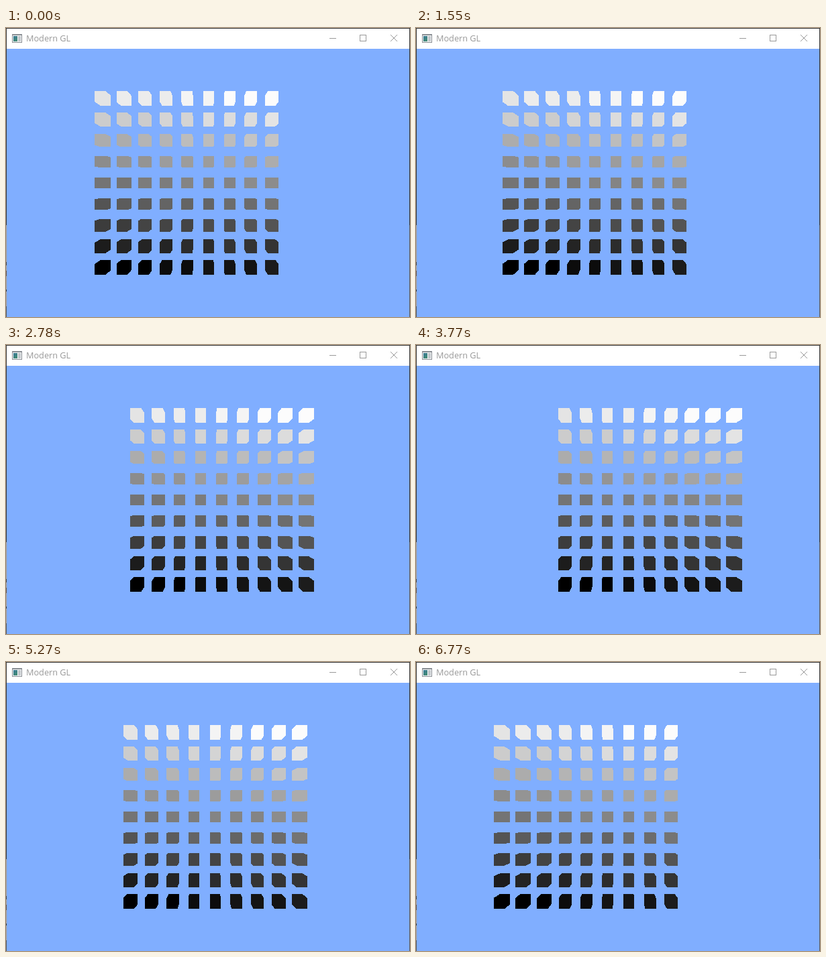
Animation, 602 px wide and 431 px high, one loop 6790 ms. Source, as an HTML page with a canvas:

```html
<!DOCTYPE html>
<html lang="en">
<head>
<meta charset="utf-8">
<title>Modern GL</title>
<style>
  html, body { margin: 0; width: 100%; height: 100%; overflow: hidden; background: #80aeff; }
  canvas { position: absolute; left: 0; top: 0; display: block; }
  #title {
    position: absolute; left: 30px; top: 7px; line-height: 17px; white-space: nowrap;
    font-family: "Open Sans", "Noto Sans", sans-serif; font-size: 12.7px; color: #999;
  }
</style>
</head>
<body>
<canvas id="view" width="602" height="431"></canvas>
<div id="title">Modern GL</div>
<script>
const ctx = document.getElementById('view').getContext('2d');
const LOOP = 6790;
const CX = 301, CY = 231;      // centre of projection
const GAP = 32.24;             // spacing of the front faces
const HALF = GAP / 4;          // half a front face
const DEPTH = 0.95;            // scale of the back faces
const SWING = 1.5 * GAP;

// Runs of evenly spaced picture changes: first time, last time, count
const runs = [
  [120, 1160, 9], [1280, 2210, 8], [2330, 3350, 8], [3500, 3770, 3],
  [4050, 4990, 8], [5140, 6110, 8], [6230, 6770, 5]
];
const steps = [0];
for (const [a, b, n] of runs)
  for (let i = 0; i < n; i++) steps.push(Math.round((a + (b - a) * i / (n - 1)) / 10) * 10);

const lerp = (a, b, t) => a + (b - a) * t;

function rect(color, x, y, w, h) {
  ctx.fillStyle = color;
  ctx.fillRect(x, y, w, h);
}

function shade(i) {
  const bin = Math.round(i / 80 * 255) >> 3;
  const v = bin ? bin * 8 + 4 : 0;
  return `rgb(${v},${v},${v})`;
}

// Silhouette of a cube, filled by hard-edged scanlines.
// (x, y) is the centre of its front face relative to the projection centre.
function cube(x, y, color) {
  ctx.fillStyle = color;
  const top = y - HALF, bottom = y + HALF;
  const y0 = Math.min(top, top * DEPTH), y1 = Math.max(bottom, bottom * DEPTH);
  for (let py = Math.floor(CY + y0); py <= CY + y1; py++) {
    const sy = py + 0.5 - CY;
    // Range of depths k whose slice crosses this line: top * k <= sy <= bottom * k
    let lo = DEPTH, hi = 1;
    for (const [edge, sign] of [[top, 1], [bottom, -1]]) {
      const e = edge * sign, s = sy * sign;
      if (e > 0) hi = Math.min(hi, s / e);
      else if (e < 0) lo = Math.max(lo, s / e);
    }
    if (lo > hi) continue;
    const left = Math.min((x - HALF) * lo, (x - HALF) * hi);
    const right = Math.max((x + HALF) * lo, (x + HALF) * hi);
    const px = Math.round(CX + left);
    ctx.fillRect(px, py, Math.round(CX + right) - px, 1);
  }
}

function icon() {
  rect('#8a8f94', 9, 9, 15, 13);
  rect('#f4f6f7', 10, 11, 13, 10);
  const g = ctx.createLinearGradient(11, 12, 17, 20);
  g.addColorStop(0, '#3f7d9c');
  g.addColorStop(1, '#3f8a6c');
  rect(g, 11, 12, 6, 8);
  rect('#c3c8cc', 18, 12, 4, 8);
}

function frame() {
  rect('#fff', 0, 0, 602, 31);
  icon();
  rect('#999', 482, 15, 10, 1);
  ctx.strokeStyle = '#999';
  ctx.lineWidth = 1;
  ctx.strokeRect(527.5, 10.5, 9, 9);
  ctx.beginPath();
  ctx.moveTo(573, 10); ctx.lineTo(583, 20);
  ctx.moveTo(583, 10); ctx.lineTo(573, 20);
  ctx.stroke();
  rect('#333', 0, 0, 602, 1);
  rect('#333', 0, 0, 1, 294);
  rect('#a59a90', 0, 294, 1, 137);
  rect('#4a4038', 0, 349, 1, 5);
  rect('#6b4f3a', 0, 362, 1, 8);
  rect('#333', 0, 390, 1, 3);
  rect('#555', 0, 415, 1, 16);
  rect('#333', 601, 0, 1, 294);
  rect('#5c5a5c', 601, 294, 1, 137);
}

function draw(time) {
  const shift = SWING * Math.sin(0.00104 * time - 2.43);
  rect('#80aeff', 0, 0, 602, 431);
  for (let row = 0; row < 9; row++)
    for (let col = 0; col < 9; col++)
      cube((col - 4) * GAP + shift, (4 - row) * GAP, shade(row * 9 + col));
  frame();
}

const start = performance.now();
let shown = -1;
function tick() {
  const t = (performance.now() - start) % LOOP;
  let now = 0;
  for (const s of steps) if (s <= t) now = s;
  if (now !== shown) draw(shown = now);
  requestAnimationFrame(tick);
}
tick();
</script>
</body>
</html>
```
